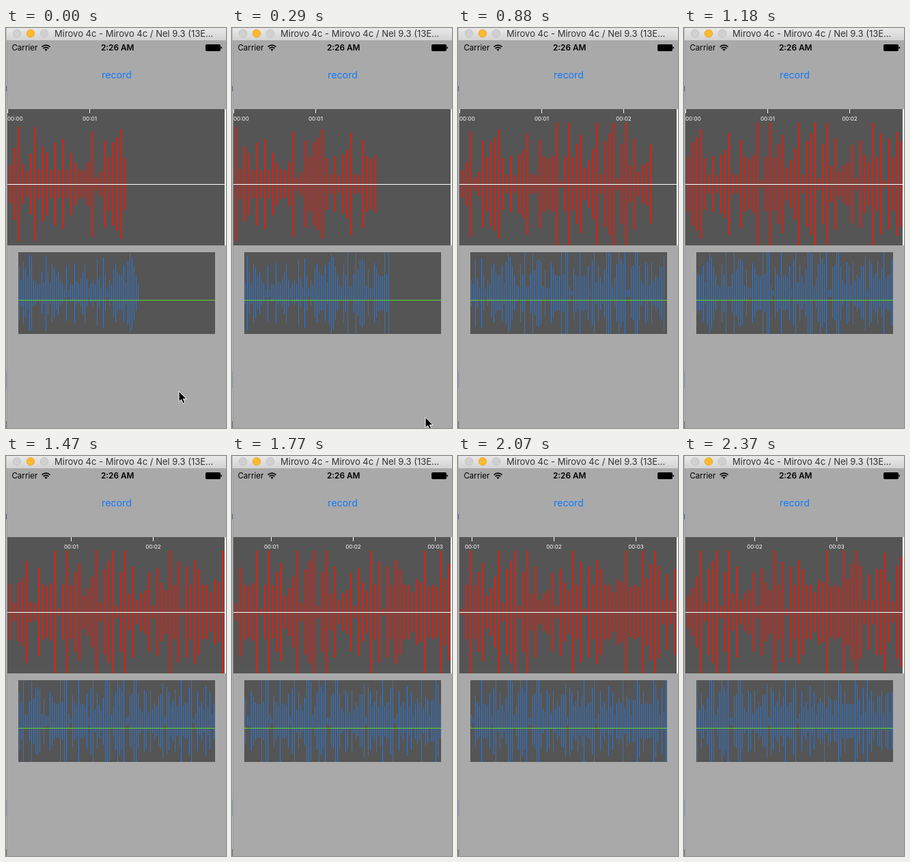
Write an HTML page that moves like this. It is 322 px wide and 587 px high and loops after 2.47 s.

```html
<!DOCTYPE html>
<html lang="en">
<head>
<meta charset="utf-8">
<title>Recorder waveform</title>
<style>
  html, body { margin: 0; width: 100%; height: 100%; overflow: hidden; background: #a9a9a9; }
  svg { display: block; }
  text { font-family: Inter, "Open Sans", sans-serif; }
  .bars { fill: none; shape-rendering: crispEdges; }
</style>
</head>
<body>
<svg width="322" height="587" viewBox="0 0 322 587">
  <defs>
    <linearGradient id="titleBar" x2="0" y2="1">
      <stop stop-color="#e9e9e9"/><stop offset="1" stop-color="#d3d3d3"/>
    </linearGradient>
  </defs>
  <rect width="322" height="587" fill="#a9a9a9"/>
  <rect width="2" height="587" fill="#b9b9bf"/>
  <rect y="504" width="2" height="24" fill="#8b9dc0"/>
  <rect y="85" width="1" height="8" fill="#556a9a"/>
  <rect y="577" width="2" height="10" fill="#777"/>
  <rect x="1" y="18" width="1" height="569" fill="#999"/>

  <rect x="1" width="321" height="18" fill="url(#titleBar)"/>
  <g stroke-width=".7">
    <circle cx="16" cy="8" r="5.8" fill="#d0d0d0" stroke="#bcbcbc"/>
    <circle cx="36" cy="8" r="5.8" fill="#fdb92f" stroke="#dfa023"/>
    <circle cx="56" cy="8" r="5.8" fill="#d0d0d0" stroke="#bcbcbc"/>
  </g>
  <text x="71" y="13" font-size="13" fill="#303030">Mirovo 4c - Mirovo 4c / Nel 9.3 (13E…</text>

  <text x="8.4" y="33" font-size="11.6">Carrier</text>
  <g fill="none" stroke="#000" stroke-width="1.7">
    <path d="M52.5 27.6q6-5 12 0M54.6 30q3.9-3.2 7.8 0"/>
    <path d="M56.4 31.6q2.1-1.5 4.2 0L58.5 33.8z" fill="#000" stroke="none"/>
  </g>
  <text x="163.2" y="33" font-size="11.8" font-weight="600" text-anchor="middle">2:26 AM</text>
  <rect x="292" y="24" width="22" height="10" rx="2"/>
  <rect x="314.5" y="27.5" width="1.5" height="3" rx=".7"/>
  <text x="162" y="74" font-size="14.2" text-anchor="middle" fill="#0f7aff">record</text>

  <rect x="320" y="119" width="2" height="200" fill="#fff"/>
  <svg x="2" y="119" width="318" height="200" viewBox="2 119 318 200">
    <rect x="2" y="119" width="318" height="200" fill="#555"/>
    <g id="ruler" fill="#fff" font-size="8.1"></g>
    <path id="mainBars" class="bars" stroke="#e61c0c" stroke-width="2"/>
  </svg>
  <rect x="2" y="229" width="320" height="1" fill="#fff"/>

  <rect x="18" y="329" width="288" height="120" fill="#555"/>
  <path id="faintBars" class="bars" stroke="#466f9f"/>
  <path id="overviewBars" class="bars" stroke="#147aff"/>
  <rect x="18" y="399" width="288" height="1" fill="#5fd835"/>

  <path id="cursor" d="M0 0V15.5L3.6 12.2L6.2 18L9 16.8L6.4 11.2H11.2Z" stroke="#fff"/>
</svg>
<script>
const LOOP = 2470;
const STEP_TIME = 148;
const STEP_LEAD = 14;
const SAMPLES_PER_STEP = 6;
const BARS_PER_SECOND = 20;

const byId = id => document.getElementById(id);

function noise(n) {
  const v = Math.sin(n * 12.9898) * 43758.5453;
  return v - Math.floor(v);
}

// Loudness from 0 to 1: random peaks shaped by syllable-like swells.
function loudness(sample) {
  const swell = Math.abs(Math.sin(sample * Math.PI / 7));
  return Math.min(1, .05 + noise(sample + 40) ** .8 * (.4 + .8 * swell));
}

function bar(x, centre, reach, sample) {
  const half = Math.round(reach * loudness(sample));
  return `M${x} ${centre - half}V${centre + half}`;
}

byId("ruler").innerHTML = [0, 1, 2, 3].map(second => {
  const x = 2 + second * 120;
  const label = second ? `x="${x + .5}" text-anchor="middle"` : `x="${x}"`;
  return `<g><rect x="${x}" y="119" width="1" height="6"/><text ${label} y="135.5">00:0${second}</text></g>`;
}).join("");

function draw(step) {
  const first = step * SAMPLES_PER_STEP;
  const recorded = 29 + 3 * step;
  const barCount = Math.min(53, recorded);
  const slotCount = Math.min(96, 2 * recorded + 1);

  let main = "", faint = "", strong = "";
  for (let i = 0; i < barCount; i++) {
    main += bar(6 + 6 * i, 229, 90, first + 2 * i);
  }
  for (let slot = 0; slot < slotCount; slot++) {
    const line = bar(19.5 + 3 * slot, 389, 60, first + slot - 1);
    if (slot % 2) strong += line; else faint += line;
  }
  byId("mainBars").setAttribute("d", main);
  byId("faintBars").setAttribute("d", faint);
  byId("overviewBars").setAttribute("d", strong);

  const scroll = Math.max(0, Math.round(18.6 * (step - 8.53)));
  byId("ruler").setAttribute("transform", `translate(${-scroll})`);
  [...byId("ruler").children].forEach((mark, second) =>
    mark.setAttribute("visibility", second * BARS_PER_SECOND <= recorded ? "visible" : "hidden"));

  // The pointer slows down as it leaves through the bottom edge.
  const eased = 1 - (1 - step / 4) ** 2;
  byId("cursor").setAttribute("visibility", step <= 4 ? "visible" : "hidden");
  byId("cursor").setAttribute("transform", `translate(${253 + 40 * eased} ${533 + 51 * eased})`);
}

let shown = -1;
const start = performance.now();
function tick() {
  const time = (performance.now() - start) % LOOP;
  const step = Math.floor((time + STEP_LEAD) / STEP_TIME);
  if (step !== shown) draw(shown = step);
  requestAnimationFrame(tick);
}
tick();
</script>
</body>
</html>
```
